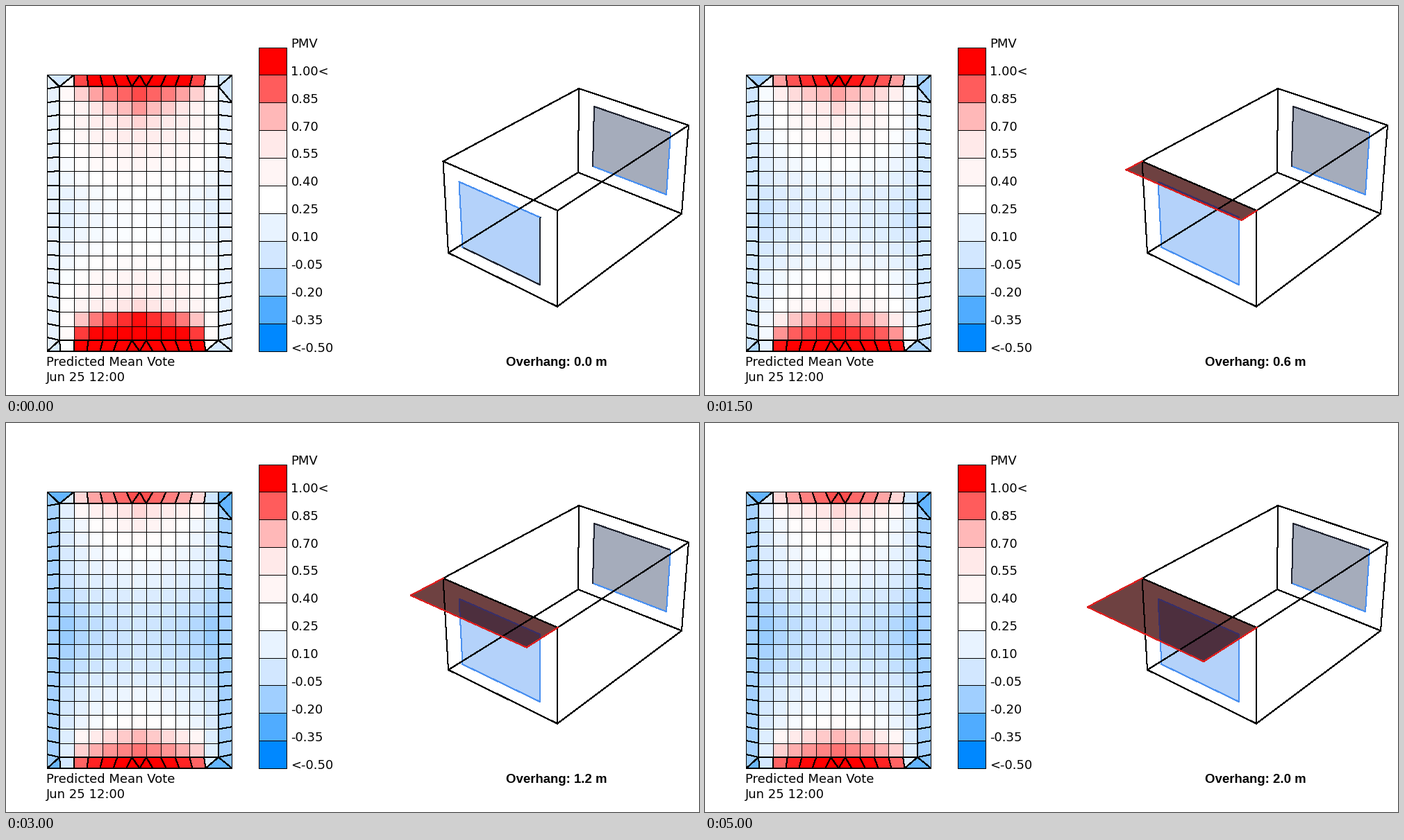
Animation, 998 px wide and 561 px high, one loop 5500 ms. Source, as a matplotlib script:

```python
import numpy as np
import matplotlib.pyplot as plt
from matplotlib.animation import FuncAnimation
from matplotlib.collections import PolyCollection
from matplotlib.patches import Polygon, Rectangle

W, H, DPI = 998, 561, 100
PX = 72 / DPI
STEPS = 11

# Legend colours, hottest first
SCALE = np.array([
    (255, 0, 0), (255, 92, 92), (255, 184, 184), (255, 233, 233),
    (255, 245, 245), (255, 255, 255), (232, 243, 255), (210, 231, 255),
    (160, 207, 255), (80, 172, 255), (0, 136, 255)]) / 255
LABELS = ["PMV", "1.00<", "0.85", "0.70", "0.55", "0.40", "0.25", "0.10",
          "-0.05", "-0.20", "-0.35", "<-0.50"]

# Comfort level per row (-1 to 18) at the room axis and beside the long walls
CENTRE = [6.0, 4.2, 3.35, 2.4, 1.85, 1.35, .9, .4, 0, -.1, -.15, -.1, .1, .5,
          1.2, 1.7, 2.3, 4.85, 5.6, 7.2]
SIDE = [.6, .6, .4, .3, .1, 0, -.3, -.6, -.9, -1.2, -1.25, -1, -.8, -.5,
        -.2, 0, .2, .4, .5, .5]
SPREAD = [1, .9, .81, .68, .45, 0]
POWER = {-1: .5, 0: .8, 1: 1.5, 16: .8, 17: .35, 18: .3}

# Share of the cooling reached at each step
SHADE = [0, 0, .3, .52, .76, .9, 1]
COOLING = 1.85

FRONT = [(629.5, 224), (794.5, 295), (794, 433.5), (637, 356)]
BACK = [(825, 119), (983, 172), (973, 299.5), (824, 240)]
FRONT_WIN = [(652.5, 253.5), (769.5, 305), (769, 402), (657.5, 348)]
BACK_WIN = [(847, 145), (957, 183), (951, 272), (845, 231)]
BLUE, DARK = "#4a90f0", "#202430"

fig = plt.figure(figsize=(W / DPI, H / DPI), dpi=DPI, facecolor="white")
ax = fig.add_axes([0, 0, 1, 1])
ax.set_xlim(0, W)
ax.set_ylim(H, 0)
ax.axis("off")


def gx(c):
    return 77 + 229 / 11 * c


def gy(r):
    return 116.3 + 365.7 / 18 * r


def ox(k):
    return 59.5 + 19 * k


def oy(k):
    return 99.5 + 19.92 * k


def level(r, c):
    w = SPREAD[abs(c - 5)] ** POWER.get(r, 1.2)
    return SIDE[r + 1] + (CENTRE[r + 1] - SIDE[r + 1]) * w


def short_wall(row, edge, inner):
    """Cells between a window wall and the regular grid."""
    cells = []
    for c in range(1, 10):
        a, b = (gx(c), inner), (gx(c + 1), inner)
        v = level(row, c)
        if c == 5:
            apex = (ox(7), edge)
            cells += [([a, b, apex], v),
                      ([a, apex, (ox(6), edge)], v),
                      ([b, apex, (ox(8), edge)], v)]
        else:
            k = c + 1 if c < 5 else c + 2
            cells.append(([a, b, (ox(k + 1), edge), (ox(k), edge)], v))
    return cells


def build_mesh():
    cells = [([(gx(c), gy(r)), (gx(c + 1), gy(r)),
               (gx(c + 1), gy(r + 1)), (gx(c), gy(r + 1))], level(r, c))
             for r in range(18) for c in range(11)]
    top, bottom, left, right = oy(0), oy(20), ox(0), ox(14)
    cells += short_wall(-1, top, gy(0)) + short_wall(18, bottom, gy(18))
    for r in range(18):
        for edge, x in ((left, gx(0)), (right, gx(11))):
            if edge == right and r == 0:
                continue
            cells.append(([(x, gy(r)), (x, gy(r + 1)),
                           (edge, oy(r + 2)), (edge, oy(r + 1))], -1.05))
    tl, tr = (gx(0), gy(0)), (gx(11), gy(0))
    bl, br = (gx(0), gy(18)), (gx(11), gy(18))
    cells += [
        ([(left, top), (ox(2), top), tl], -1.9),
        ([(left, top), (left, oy(1)), tl], -1.3),
        ([tl, (ox(2), top), (gx(1), gy(0))], .3),
        ([(ox(13), top), (right, top), tr], -1.9),
        ([(right, top), (right, oy(2)), tr], -1.9),
        ([tr, (gx(11), gy(1)), (right, oy(2))], -1.2),
        ([tr, (gx(10), gy(0)), (ox(12), top), (ox(13), top)], -.2),
        ([(left, bottom), (ox(1), bottom), bl], -1.8),
        ([(left, bottom), (left, oy(19)), bl], -1.2),
        ([bl, (gx(1), gy(18)), (ox(2), bottom), (ox(1), bottom)], -.1),
        ([(ox(12), bottom), (right, bottom), br], -1.9),
        ([(right, bottom), (right, oy(19)), br], -1.4),
        ([br, (gx(10), gy(18)), (ox(12), bottom)], .2),
    ]
    return [p for p, _ in cells], np.array([v for _, v in cells])


def colours(levels):
    pos = np.clip(5 - levels, 0, 10)
    return np.stack([np.interp(pos, range(11), SCALE[:, k])
                     for k in range(3)], axis=1)


def line(points, color="black", z=5):
    xs, ys = zip(*points)
    return ax.plot(xs, ys, color=color, lw=PX, antialiased=False, zorder=z)[0]


def patch(points, face, z, edge="none"):
    p = Polygon(points, closed=True, facecolor=face, edgecolor=edge,
                lw=PX, antialiased=False, zorder=z)
    return ax.add_patch(p)


def label(x, y, s, size=18, **kw):
    return ax.text(x, y, s, fontsize=size * PX, va="baseline",
                   **{"family": "DejaVu Sans", **kw})


# Floor plan
polys, base = build_mesh()
mesh = PolyCollection(polys, facecolors=colours(base), edgecolors="black",
                      linewidths=PX, antialiaseds=False)
ax.add_collection(mesh)
label(58, 519, "Predicted Mean Vote")
label(58, 541, "Jun 25 12:00")

# Legend
BAND = 438.5 / 11
for k, rgb in enumerate(SCALE):
    ax.add_patch(Rectangle((364.5, 59.5 + k * BAND), 40, BAND, facecolor=rgb,
                           edgecolor="black", lw=PX, antialiased=False))
for k, s in enumerate(LABELS):
    label(410.5, 60 + k * BAND, s)

# Room
patch(BACK_WIN, "#a5acbb", 1)
patch(FRONT_WIN, "#b4d2fa", 1)
for k, color in enumerate([DARK, BLUE, BLUE, DARK]):
    line([BACK_WIN[k], BACK_WIN[(k + 1) % 4]], color, 2)
sides = [line([FRONT_WIN[k], FRONT_WIN[(k + 1) % 4]], BLUE, 2)
         for k in range(4)]
for k in range(4):
    line([FRONT[k], FRONT[(k + 1) % 4]])
    line([BACK[k], BACK[(k + 1) % 4]])
    line([FRONT[k], BACK[k]])

# Overhang, with the window showing through it
slab = patch(FRONT[:2] + FRONT[1::-1], "#6e4141", 3)
through = patch(FRONT_WIN, "#4d2f3e", 4, "#3a2f66")
rim = line([FRONT[0], FRONT[1]], "#dc1e1e", 6)
caption = label(720, 519, "", 18.6, family="Liberation Sans", weight="bold")


def overhang(d):
    (ax0, ay0), (bx0, by0) = FRONT[:2]
    a = (ax0 - 38.3 * d - .55 * d * d, ay0 + 20.2 * d + .25 * d * d)
    b = (bx0 - 36 * d - 1.1 * d * d, by0 + 23 * d + .75 * d * d)
    return a, b


def draw(i):
    d = .2 * i
    mesh.set_facecolor(colours(base - COOLING * SHADE[min(i, 6)]))
    a, b = overhang(d)
    slab.set_xy([FRONT[0], a, b, FRONT[1]])
    through.set_clip_path(slab)
    rim.set_data(*zip(FRONT[0], a, b, FRONT[1]))
    for part in (slab, through, rim):
        part.set_visible(i > 0)
    for side in sides[1:3]:
        side.set_color(BLUE if i else DARK)
    caption.set_text(f"Overhang: {d:.1f} m")
    return mesh, slab, through, rim, caption


anim = FuncAnimation(fig, draw, frames=STEPS, interval=500, repeat=True,
                     repeat_delay=0, blit=False)
plt.show()
```
